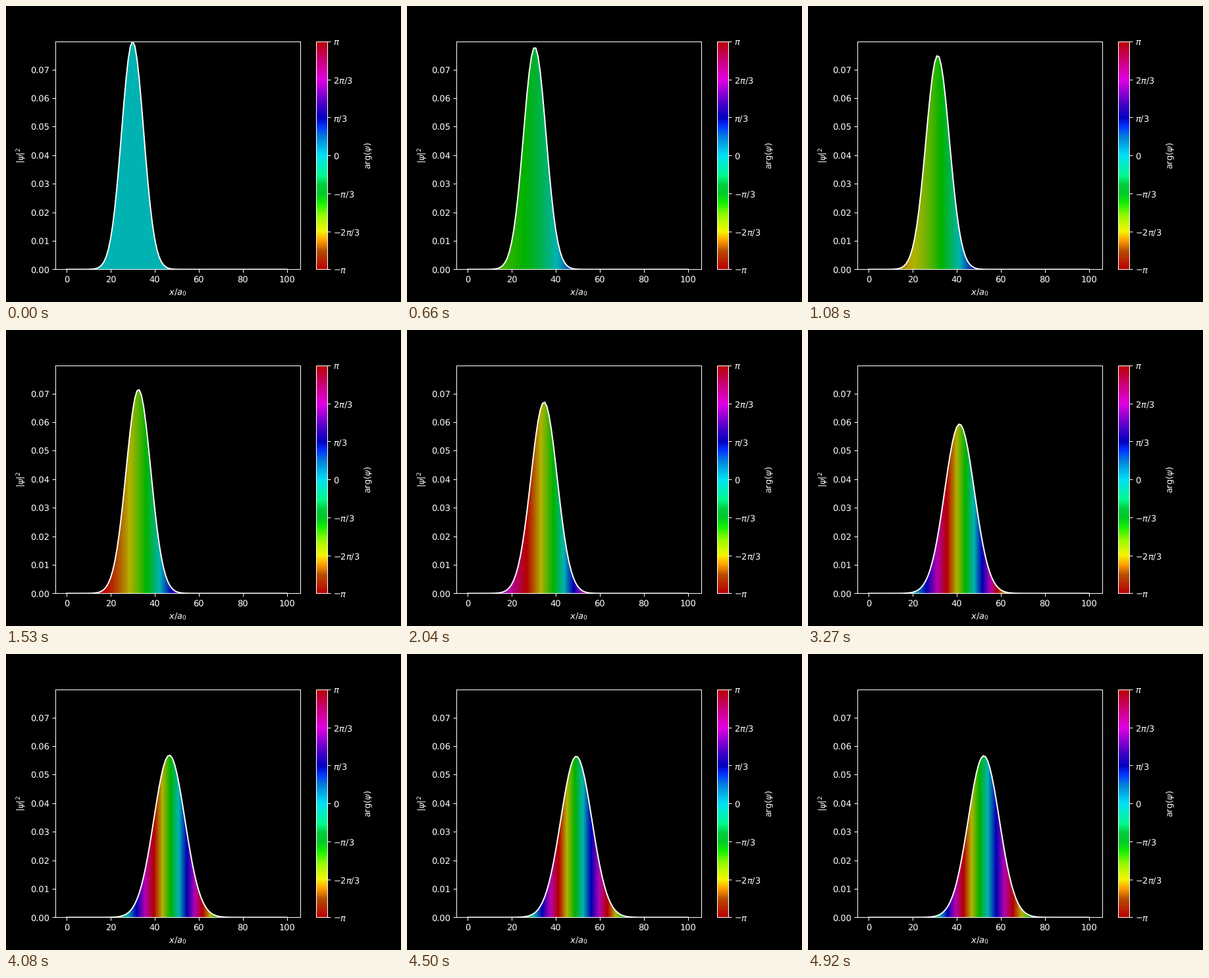
Animation of 600 by 450 pixels, one loop 4.95 s. Source, as a matplotlib script:

```python
import numpy as np
import matplotlib.pyplot as plt
from matplotlib.animation import FuncAnimation
from matplotlib.cm import ScalarMappable
from matplotlib.colors import LinearSegmentedColormap, Normalize, hsv_to_rgb

WIDTH, HEIGHT, DPI = 600, 450, 93.75
SLOTS, INTERVAL = 165, 30
OMEGA = np.sqrt(2e-4)      # harmonic trap, hbar = m = 1
DT = 0.8
MID, AMP, S0 = 50, 20, 5   # trap centre, initial offset, initial width
TOP = 1 / (S0 * np.sqrt(2 * np.pi))

x = np.arange(101)
x_fine = np.linspace(0, 100, 1001)


def packet(theta):
    """Centre, variance and phase on x_fine of the Gaussian packet."""
    sin, cos = np.sin(theta), np.cos(theta)
    centre = MID - AMP * cos
    var = S0**2 * (1 + sin**2)
    chirp = S0**2 * OMEGA * sin * cos / (2 * var)
    momentum = AMP * OMEGA * sin
    action = -AMP**2 * OMEGA * np.sin(2 * theta) / 4
    gouy = -np.arctan2(np.sqrt(2) * sin, cos) / 2
    d = x_fine - centre
    return centre, var, chirp * d**2 + momentum * d + action + gouy


def phase_colors(phase):
    hue = (phase + np.pi) / (2 * np.pi) % 1
    hsv = np.stack([hue, np.ones_like(hue), np.full_like(hue, 0.7)], axis=-1)
    return hsv_to_rgb(hsv)[np.newaxis]


def add_axes(left, top, right, bottom):
    """Axes from pixel edges, counted from the top left corner."""
    return fig.add_axes([left / WIDTH, 1 - bottom / HEIGHT,
                         (right - left) / WIDTH, (bottom - top) / HEIGHT])


def cover_outline(density):
    """Area above the curve."""
    return [(-5, TOP), (-5, 0), *zip(x, density), (105, 0), (105, TOP)]


plt.style.use("dark_background")
plt.rcParams["text.hinting"] = "none"
fig = plt.figure(figsize=(WIDTH / DPI, HEIGHT / DPI), dpi=DPI)
ax = add_axes(75, 54, 447, 400.45)
bar_ax = add_axes(470.6, 54, 487.6, 400.45)

phase_map = LinearSegmentedColormap.from_list("phase", [
    (0, "#b90000"), (0.08, "#b84c00"), (0.125, "#ffa000"),
    (1 / 6, "#f5f500"), (0.235, "#96fa00"), (0.29, "#14f000"),
    (1 / 3, "#00c828"), (0.37, "#00cd3c"), (0.41, "#00fa8c"),
    (0.5, "#00e1f5"), (0.58, "#0082dc"), (0.63, "#0032ff"),
    (2 / 3, "#0000be"), (0.725, "#4600c8"), (5 / 6, "#e100e1"),
    (0.91, "#cd0082"), (1, "#b90000")])
bar = fig.colorbar(ScalarMappable(Normalize(-np.pi, np.pi), phase_map),
                   cax=bar_ax, ticks=np.arange(-3, 4) * np.pi / 3)
bar_ax.set_yticklabels([r"$-\pi$", r"$-2\pi/3$", r"$-\pi/3$", "$0$",
                        r"$\pi/3$", r"$2\pi/3$", r"$\pi$"])
bar.set_label(r"$\arg(\psi)$")

fill = ax.imshow(phase_colors(0 * x_fine), extent=(0, 100, 0, TOP),
                 aspect="auto", interpolation="nearest", zorder=0)
cover, = ax.fill([0, 1, 1], [0, 0, 1], color="black", lw=0, zorder=1)
line, = ax.plot(x, 0 * x, color="white", lw=1.5)
ax.set_xlim(-5.05, 106.05)
ax.set_ylim(0, TOP)
ax.set_xlabel("$x/a_0$")
ax.set_ylabel(r"$|\psi|^2$")


def update(slot):
    # 150 steps over 165 slots: one step in ten is held twice
    step = slot - (slot + 6) // 11
    centre, var, phase = packet(OMEGA * DT * step)
    density = np.exp(-(x - centre)**2 / (2 * var)) / np.sqrt(2 * np.pi * var)
    line.set_ydata(density)
    fill.set_data(phase_colors(phase))
    cover.set_xy(cover_outline(density))
    return fill, cover, line


anim = FuncAnimation(fig, update, frames=SLOTS, interval=INTERVAL, repeat=True)
plt.show()
```
